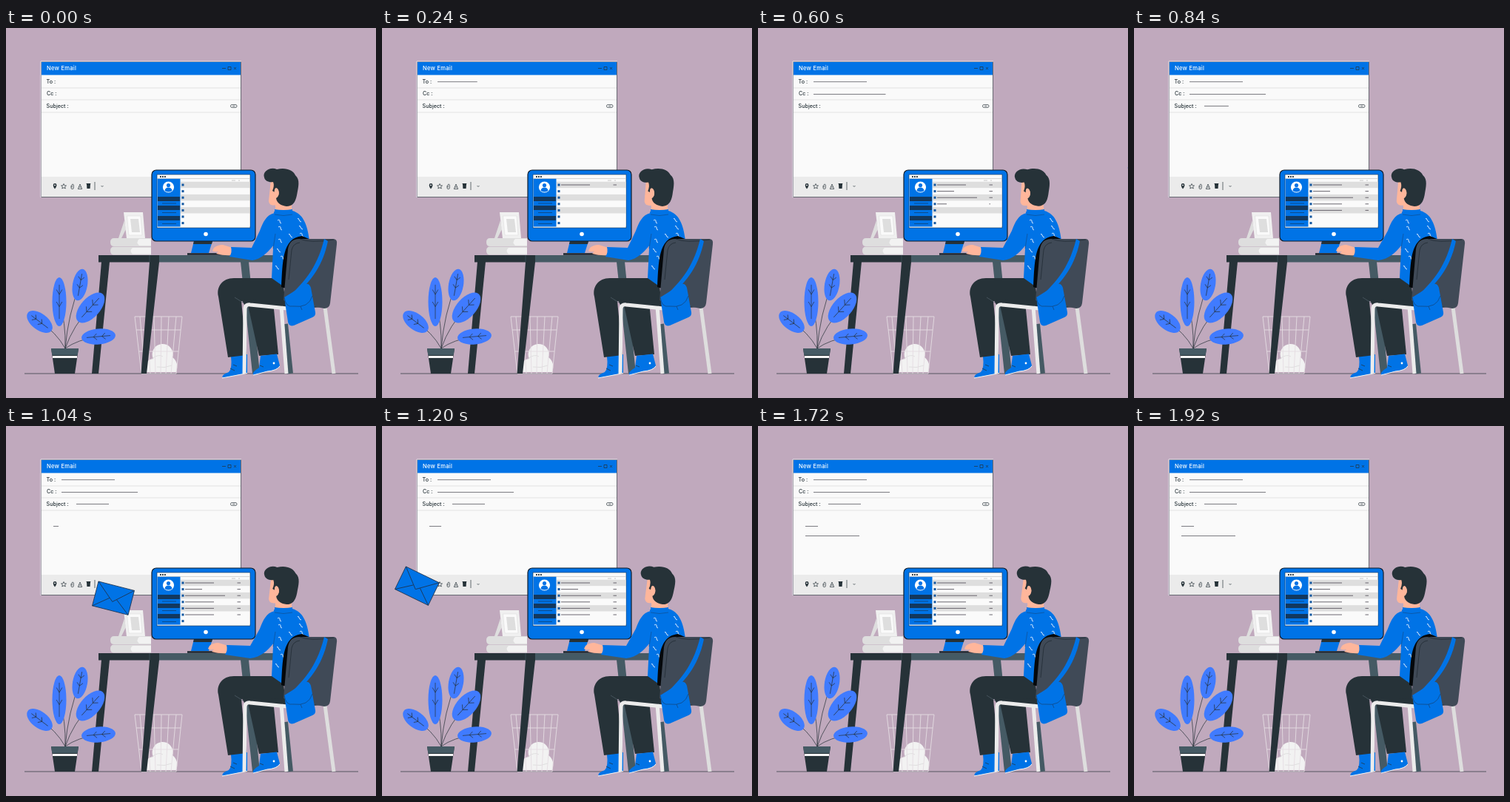
Write an HTML page that moves like this. It is 500 px wide and 500 px high and loops after 1960 ms.

```html
<!DOCTYPE html>
<html lang="en">
<head>
<meta charset="utf-8">
<title>Writing an email</title>
<style>
html, body { margin: 0; width: 100%; height: 100%; overflow: hidden; background: #c0a9bd; }
svg { display: block; width: 100vw; height: 100vh; }
text { font: 500 7.2px Inter, sans-serif; fill: #263238; }
.thin { fill: none; stroke: #263238; stroke-width: .7; }
.line { fill: none; }
.blue { fill: #0073e6; }
.dark { fill: #263238; }
.slate { fill: #455a64; }
.pale { fill: #f2f2f2; }
.grey { fill: #dedede; }
.skin { fill: #ffb69b; }
.leg { fill: none; stroke: #ececec; stroke-width: 5; }
</style>
</head>
<body>
<svg viewBox="0 0 500 500">
  <path class="thin" d="M25 467H476"/>

  <!-- email window -->
  <g>
    <rect x="47.5" y="45.5" width="270" height="183" fill="#fafafa" stroke="#4a4f58" stroke-width=".8"/>
    <path d="M47 229V45H318" fill="none" stroke="#e9e4ee"/>
    <rect class="blue" x="48" y="46" width="269" height="17.5"/>
    <rect x="48" y="201" width="269" height="27" fill="#ebebeb"/>
    <path d="M48 81H317M48 97H317M48 114H317" stroke="#dcdcdc" stroke-width=".8"/>
    <text x="55" y="57" style="fill:#fff;font-size:7.6px;letter-spacing:.25px">New Email</text>
    <text x="54.5" y="74.5">To :</text>
    <text x="55" y="91">Cc :</text>
    <text x="54.5" y="108">Subject :</text>
    <path class="thin" d="M292 54.5H297M300 52.5H304V56.5H300ZM308 53L311 56M311 53L308 56M305.500 107.500H310A2 2 0 0 0 310 103.500H305.500A2 2 0 0 0 305.500 107.500M306 105.500H309.500"/>
    <path class="dark" d="M66 217.5Q63.5 214 63.7 212.5A2.4 2.4 0 0 1 68.5 212.5Q68.5 214 66 217.5ZM109 211H114L113.6 217H109.4ZM108.6 210H114.3V211H108.6Z"/>
    <circle cx="66" cy="212.4" r=".9" fill="#fff"/>
    <path class="thin" d="M78 210.5L79 212.8L81.5 213L79.6 214.6L80.3 217L78 215.7L75.8 217L76.4 214.6L74.5 213L77 212.8ZM88 213V216A1.6 1.6 0 0 0 91.3 216V212A1.2 1.2 0 0 0 89 212V215.5M97.5 217L100 211L102.5 217M98.4 215H101.6M97 217.5H103M120 208V219M128.5 213L130 214.5L131.5 213"/>
    <path id="mail" stroke="#5b5b62" stroke-width=".8"/>
  </g>

  <!-- bin -->
  <path class="pale" d="M190 465Q186 448 199 447A14 14 0 1 1 225 445Q234 452 230 465Z"/>
  <path d="M197 447Q206 440 212 444M204 458Q214 460 224 456" fill="none" stroke="#dadada" stroke-width=".8"/>
  <path d="M174 390H238L230 467H183ZM176 408H236M180 437H233M181 390L188 467M190 390L195 467M200 390L202 467M210 390L209 467M220 390L216 467M230 390L223 467" fill="none" stroke="#e5dde3" stroke-width=".9"/>

  <!-- desk -->
  <path class="slate" d="M317 316H328L343 467H333Z"/>
  <path class="dark" d="M129 316H140L125 467H116Z"/>
  <path class="slate" d="M200 307H368V316.500H200Z"/>
  <path class="dark" d="M125 307H207V316.500L190 467H182.500L194 316.500H125Z"/>
  <path d="M194 307V316.500" stroke="#455a64" stroke-width=".6"/>

  <!-- plant -->
  <g id="plant"></g>
  <path class="dark" d="M61 433H98L93 467H66Z"/>
  <path class="slate" d="M61 433H98L96.8 442H62.3Z"/>
  <path d="M63 444.5H96" stroke="#f5f5f5" stroke-width="3"/>

  <!-- books and picture frame -->
  <path class="grey" d="M160 260L152 284H156L162 272Z"/>
  <path d="M159 249H185L188 284.500H163Z" fill="#f0f0f0"/>
  <path d="M163.500 254H182L184 280H166Z" fill="#fafafa" stroke="#dcdcdc" stroke-width=".6"/>
  <path class="grey" d="M168 258H179L181 276H170Z"/>
  <path class="grey" d="M196 284H146Q141 284 141 289.500T146 295H196ZM196 295.500H146Q141 295.500 141 301T146 306.500H196Z"/>
  <path class="pale" d="M196 285H180Q175 289.500 180 294H196ZM196 297H171Q166 301 171 305.500H196Z"/>

  <!-- flying envelopes -->
  <g id="sent" fill="none" stroke="#2c6fd2" stroke-width=".8">
    <path d="M-21 -22H21V22H-21ZM-21 -22L0 4L21 -22M-21 22L-4 0M21 22L4 0"/>
  </g>
  <g id="blueMail" stroke="#20344f" stroke-width=".8">
    <path class="blue" d="M-25 -17H25V17H-25Z"/>
    <path class="line" d="M-25 17L-5 1M25 17L5 1M-25 -17L0 5L25 -17"/>
  </g>

  <!-- monitor -->
  <path class="blue" d="M254 288H279L274 304H250Z"/>
  <path class="dark" d="M254 288H279L278 292H253Z"/>
  <path d="M245 305.500H303" stroke="#17232b" stroke-width="2.500"/>
  <rect class="blue" x="197" y="192" width="140" height="96" rx="6" stroke="#101d2b" stroke-width="1.200"/>
  <rect x="204" y="198" width="126" height="72" fill="#fafafa" stroke="#17324f" stroke-width=".6"/>
  <rect class="blue" x="204.500" y="203.500" width="31" height="65"/>
  <path d="M205 203.500H330" stroke="#bbb" stroke-width=".6"/>
  <path d="M208 201h1.800m1.200 0h1.800m1.200 0h1.800" stroke="#263238" stroke-width="1.800"/>
  <path d="M305 206h5m4 0h2" stroke="#c8c8c8"/>
  <circle cx="219.500" cy="215" r="7.600" fill="#fff"/>
  <circle class="blue" cx="219.500" cy="212.500" r="2.600"/>
  <path class="blue" d="M214.500 220Q215 215.500 219.500 215.500T224.500 220Q219.500 223 214.500 220Z"/>
  <path d="M205 231H235M205 243H235M205 257H235" stroke="#12385f" stroke-width="6"/>
  <path d="M211 237H230M211 249.500H230M211 264.500H230" stroke="#123a66" stroke-width=".7"/>
  <g id="rows"></g>
  <path id="inbox" stroke="#5b5660" stroke-width=".9"/>
  <circle cx="270" cy="278.500" r="2.800" fill="#fff"/>

  <!-- legs and shoes -->
  <path class="dark" d="M326 370L342 443L368 441L361 370Z"/>
  <path class="blue" d="M344 443L366 440.500L370 456Q368 462 353 464L334 469Q332 465 342 459Z"/>
  <path d="M334 469L353 464Q366 463 370 457" fill="none" stroke="#f5f5f5"/>
  <circle cx="362" cy="453" r="1.400" fill="#fff"/>
  <path class="blue" d="M304 444L326 441V466L293 473Q290 469 301 465Q306 460 304 444Z"/>
  <path d="M292 473L326 466.500" stroke="#f5f5f5"/>
  <path class="thin" d="M303 460l6 3M307 455l5 2M343 456l5 2"/>
  <path class="dark" d="M374 338H308C292 338 284 350 287 363L300 445L325 442L318 369L378 376Z"/>
  <path d="M309 364L320 371L376 372" fill="none" stroke="#52616a" stroke-width=".7"/>

  <!-- body -->
  <path class="blue" d="M362 248C371 251 380 250 387 247C401 251 407 264 410 287L376 350L359 338L361 298Z"/>
  <path id="hand" class="skin"/>
  <path id="sleeve" class="blue"/>
  <g id="head">
    <path class="skin" d="M358 204C357 216 356 224 355 234C356 239 359 240 364 239.500V248H386V226L376 204Z"/>
    <path class="dark" d="M349 202C346 194 357 187 366 191C378 188 388 192 391 199C398 205 395 215 393 226C391 236 387 241 379 241C372 240 366 237 365 230C370 228 370 217 365 216Q362 217 363 222L360 220Q363 213 361 208C356 209 350 207 349 202Z"/>
    <ellipse class="skin" cx="365.500" cy="223" rx="3.200" ry="5"/>
  </g>
  <path class="blue" d="M363 245Q375 247 387 245V252Q375 255 363 252Z"/>
  <path d="M363 252Q375 255 387 252M361 298L364 278" fill="none" stroke="#124f91" stroke-width=".7"/>
  <path id="squiggles" fill="none" stroke="#dcecff" stroke-width="1"/>

  <!-- chair and bag -->
  <path d="M372 350C374 316 373 284 400 281L414 287C388 292 386 320 378 352Z" fill="#05080b"/>
  <path class="dark" d="M318 366L378 369L430 377L378 380L322 374Z"/>
  <path d="M377 400L384 467" stroke="#455a64" stroke-width="8"/>
  <path class="leg" d="M372 376L379 467"/>
  <path class="leg" d="M431 377L443 467" style="stroke:#dedede"/>
  <path class="leg" d="M380 379L330 374Q323 373 323 380L322 467"/>
  <path d="M381 299Q383 285 396 285H442Q448 285 447 292L438 372Q437 379 430 379L375 368Z" fill="#404a57"/>
  <path d="M382 340L386 300Q388 291 397 290M397 285Q410 291 443 286" fill="none" stroke="#222c35" stroke-width=".8"/>
  <path class="blue" d="M430 285L435 288C429 318 414 342 388 363L378 366C407 342 422 318 430 285Z"/>
  <path class="blue" d="M376 364L405 346Q410 345 412 351L418 384Q419 389 414 391L389 402Q382 404 381 397Z"/>
  <path d="M376 364Q378 378 388 376Q409 379 414 362M398 376l2 5" fill="none" stroke="#124a85" stroke-width=".8"/>
</svg>
<script>
const LOOP = 1960, STEP = 40;
const $ = id => document.getElementById(id);
const clamp = v => Math.max(0, Math.min(1, v));
const ease = v => (v = clamp(v), v * v * (3 - 2 * v));
const set = (id, d) => $(id).setAttribute('d', d);
const place = (id, x, y, a) => $(id).setAttribute('transform', `translate(${x} ${y}) rotate(${a})`);

// x, y and full length of each typed line
const typed = [[75, 72.7, 72], [75, 89.5, 103], [95, 105.5, 44], [64, 135.5, 17], [64, 148.5, 73]];
const subjects = [39, 23, 54, 39, 39, 39];
const rowY = i => 212 + 8.6 * i;

// cx, cy, half length, half width, angle
const leaves = [[45.5, 397, 20, 11, 37], [72, 370, 33, 9.5, 90], [100, 347, 21.5, 10, 100], [114, 378, 25, 13, -48], [125, 417, 23, 10.5, -5]];
$('plant').innerHTML = leaves.map(([x, y, a, b, r], i) => {
  const side = i < 3 ? 1 : -1;
  const veins = [-.3, .2].map(k => `M${k * a} 0l${-side * a * .2} ${b * .4}M${k * a} 0l${-side * a * .2} ${-b * .4}`).join('');
  return `<path class="thin" d="M${x} ${y}Q${(x + 80) / 2 + (x > 80 ? -6 : 5)} ${(y + 433) / 2 - 4} 80 433"/>
    <g transform="translate(${x} ${y}) rotate(${r})"><ellipse rx="${a}" ry="${b}" fill="#407bff"/>
    <path class="thin" d="M${-a * .7} 0H${a * .7}${veins}"/></g>`;
}).join('');

$('rows').innerHTML = [...Array(7).keys()].map(i =>
  `<rect x="236" y="${rowY(i) - 4.3}" width="93.5" height="8.6" fill="${i % 2 || i > 5 ? '#fafafa' : '#dedede'}"/>
   <rect x="237.500" y="${rowY(i) - 1.5}" width="3" height="3" fill="#12569f"/>`).join('');

const marks = [[367, 260], [394, 258], [368, 269], [396, 268], [368, 286], [382, 279], [397, 278], [364, 322], [371, 309], [366, 299]];
set('squiggles', marks.map(([x, y], i) => `M${x} ${y}q${i % 2 ? 1 : 3} -2 ${i % 2 ? 2 : 3} 1t${i % 2 ? 3 : 2} 3`).join(''));

function draw(t) {
  set('mail', typed.map(([x, y, w], i) => `M${x} ${y}h${w * clamp((t - 16) / 300 - i)}`).join(''));

  set('inbox', subjects.map((w, i) => {
    const p = clamp((t - 80 - 160 * i) / 120), y = rowY(i);
    return p ? `M242 ${y}h${w * p}M312.500 ${y}h${4.5 * p}` : '';
  }).join(''));

  const out = Math.max(0, t - 177), left = Math.max(0, t - 840);
  place('sent', 267 + .61 * out, 238 - .076 * out, -.027 * out);
  place('blueMail', 267 - .61 * left, 240 - 1.84e-4 * left * left, .072 * left);

  const d = -6 * ease((t - 450) / 300) * (1 - ease((t - 1250) / 400));
  set('hand', `M${306 + d} 297L${293 + d} 293Q${286 + d} 293 ${281 + d} 297L${279 + d} 301Q${281 + d} 303 ${287 + d} 302L${284 + d} 305Q${295 + d} 308 ${306 + d} 307Z`);
  set('sleeve', `M363 250C352 252 347 263 343 274L${332 + d / 3} 297L${304 + d} 296Q${306 + d} 303 ${302 + d} 309L${333 + d / 2} 314C345 312 353 304 363 292L374 254Z`);

  const tilt = -2.2 * Math.sin(2 * Math.PI * t / LOOP);
  $('head').setAttribute('transform', `rotate(${tilt} 375 246)`);
}

const start = performance.now();
function tick() {
  const t = (performance.now() - start) % LOOP;
  draw(Math.floor(t / STEP) * STEP);
  requestAnimationFrame(tick);
}
tick();
</script>
</body>
</html>
```
